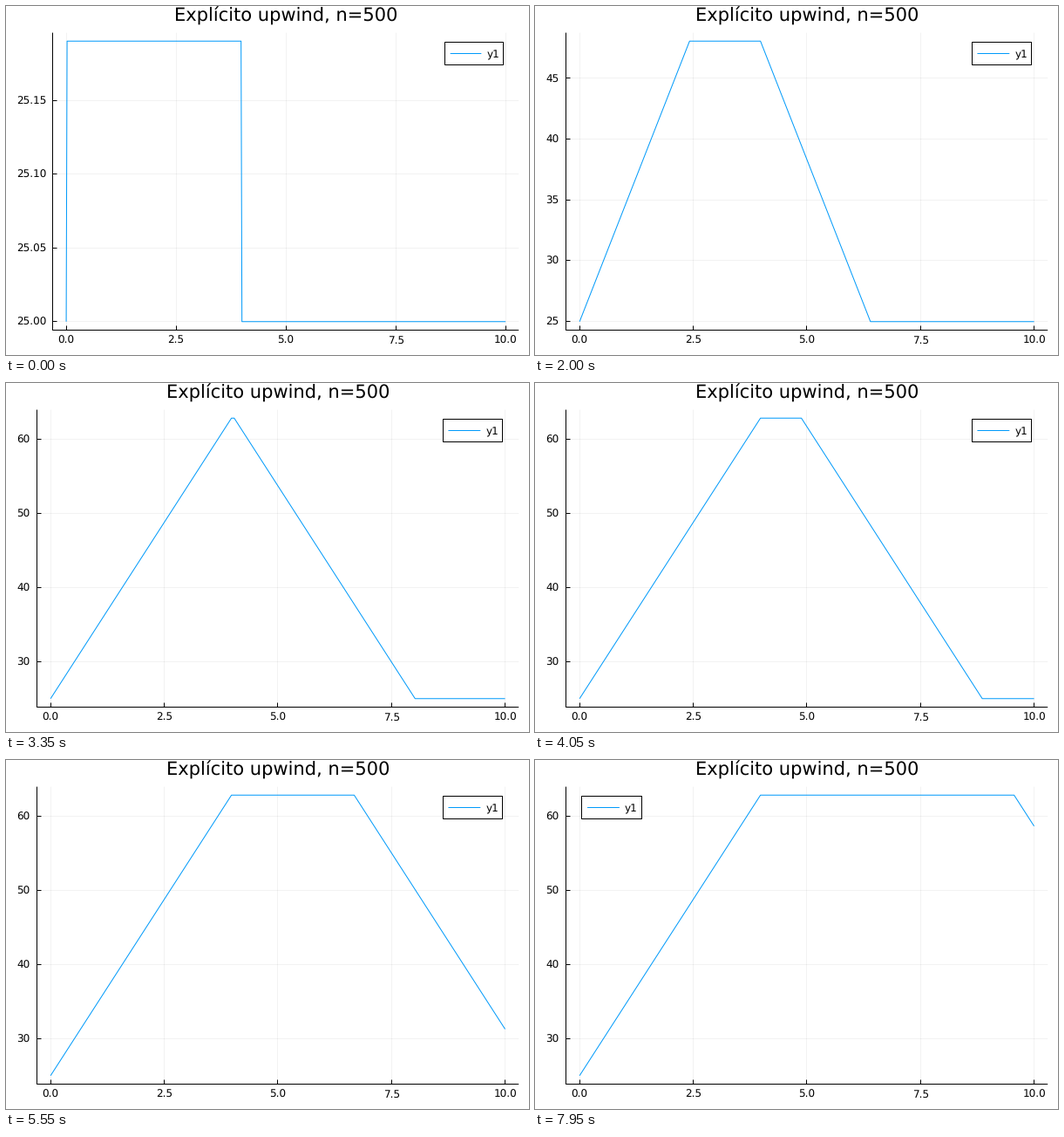
These frames come from a looping animation (600 by 400 pixels, 8 s). A matplotlib script:

```python
import matplotlib.pyplot as plt
import numpy as np
from matplotlib.animation import FuncAnimation
from matplotlib.patches import Rectangle

W, H, DPI = 600, 400, 100
FRAMES, INTERVAL = 160, 50
TOP, BOTTOM, RIGHT = 30.6, 371.4, 588.2
LEFT_EDGE = {2: 35.5, 4: 46.5, 5: 53.95}  # by tick label length
BLUE = "#009AFA"

# Heated pipe: cells 1..HEATED gain GAIN per step, flow moves one cell per step
CELLS, HEATED, GAIN, BASE = 500, 199, 0.1902, 25.0
STEPS_PER_FRAME = 3
NICENESS = {1: 1.0, 5: 0.9, 2: 0.7, 2.5: 0.5, 3: 0.2}

cell = np.arange(CELLS + 1)
xs = cell * 10 / CELLS

plt.rcParams["font.family"] = "DejaVu Sans"
plt.rcParams["text.hinting"] = "none"
fig = plt.figure(figsize=(W / DPI, H / DPI), dpi=DPI, facecolor="white")
ax = fig.add_axes([0, 0, 1, 1])


def px(size):
    return size * 72 / DPI


def crisp(v):
    """Centre of the pixel that holds v."""
    return np.floor(v) + 0.5


def temperature(step):
    heated = np.minimum(cell, HEATED) - np.maximum(cell - step, 0)
    return BASE + GAIN * np.maximum(heated, 0)


def widen(lo, hi):
    pad = 0.03 * (hi - lo)
    return lo - pad, hi + pad


def nice_ticks(lo, hi):
    """Best evenly spaced ticks by granularity, coverage and niceness."""
    best, best_score = None, -np.inf
    for power in range(2, -4, -1):
        for q in sorted(NICENESS, reverse=True):
            step = q * 10.0 ** power
            first, last = np.ceil(lo / step), np.floor(hi / step)
            n = int(last - first) + 1
            if not 4 <= n <= 8:
                continue
            coverage = 1.5 * (hi - lo) / ((n - 1) * step)
            score = (1 - abs(n - 5) / 5) / 4 + coverage / 3 + NICENESS[q] / 4
            if score > best_score + 1e-9:
                best, best_score = step * np.arange(first, last + 1), score
    return best


def labels_for(ticks):
    digits = next(d for d in range(5)
                  if np.allclose(ticks, np.round(ticks, d), rtol=0, atol=1e-7))
    return [f"{t:.{digits}f}" for t in ticks]


def line(x, y, color="black", **kw):
    ax.plot(x, y, color=color, lw=px(1), snap=False,
            solid_capstyle="butt", **kw)


def text(x, y, s, size=12, ha="left"):
    ax.text(x, y, s, fontsize=px(size), ha=ha, va="baseline", zorder=6)


def draw_legend(left, on_right):
    width = RIGHT - left
    unit = width / 45
    box_w = 4.5 * unit + 13.2
    x = RIGHT - width / 30 - box_w if on_right else left + width / 30
    y = TOP + (BOTTOM - TOP) / 30
    x0, x1, y0, y1 = crisp(np.array([x, x + box_w, y, y + 26]))
    ax.add_patch(Rectangle((x0, y0), x1 - x0, y1 - y0, fc="white", ec="black",
                           lw=px(1), snap=False, zorder=4))
    line([x + 0.5 * unit, x + 3.5 * unit], [crisp(y + 13)] * 2, BLUE, zorder=5)
    text(x + 4 * unit, y + 17.2, "y1")


def draw(frame):
    ax.clear()
    ax.set(xlim=(0, W), ylim=(H, 0))
    ax.axis("off")

    ys = temperature(1 + STEPS_PER_FRAME * frame)
    x_lo, x_hi = widen(0, 10)
    y_lo, y_hi = widen(ys.min(), ys.max())
    ticks = nice_ticks(y_lo, y_hi)
    labels = labels_for(ticks)
    left = LEFT_EDGE[len(labels[0])]
    axis_x, axis_y = crisp(left), crisp(BOTTOM)

    def to_x(v):
        return left + (v - x_lo) / (x_hi - x_lo) * (RIGHT - left)

    def to_y(v):
        return BOTTOM - (v - y_lo) / (y_hi - y_lo) * (BOTTOM - TOP)

    for v in np.linspace(0, 10, 5):
        x = crisp(to_x(v))
        line([x, x], [TOP, BOTTOM], alpha=0.05, zorder=1)
        line([x, x], [axis_y - 5, axis_y], zorder=3)
        text(to_x(v), 387, f"{v:.1f}", ha="center")
    for v, label in zip(ticks, labels):
        y = crisp(to_y(v))
        line([left, RIGHT], [y, y], alpha=0.05, zorder=1)
        line([axis_x, axis_x + 5], [y, y], zorder=3)
        text(12, to_y(v) + 4.4, label)

    line([axis_x, axis_x, RIGHT], [TOP, axis_y, axis_y], zorder=3)
    line(to_x(xs), to_y(ys), BLUE, zorder=3.5)
    text((left + RIGHT) / 2, 18, "Explícito upwind, n=500", 21, "center")

    # The legend leaves the top right corner once the curve reaches it
    corner = (xs > x_lo + 0.75 * (x_hi - x_lo)) & (ys > y_lo + 0.75 * (y_hi - y_lo))
    draw_legend(left, not corner.any())
    return []


anim = FuncAnimation(fig, draw, frames=FRAMES, interval=INTERVAL,
                     init_func=lambda: [], repeat=True, repeat_delay=0)
plt.show()
```
